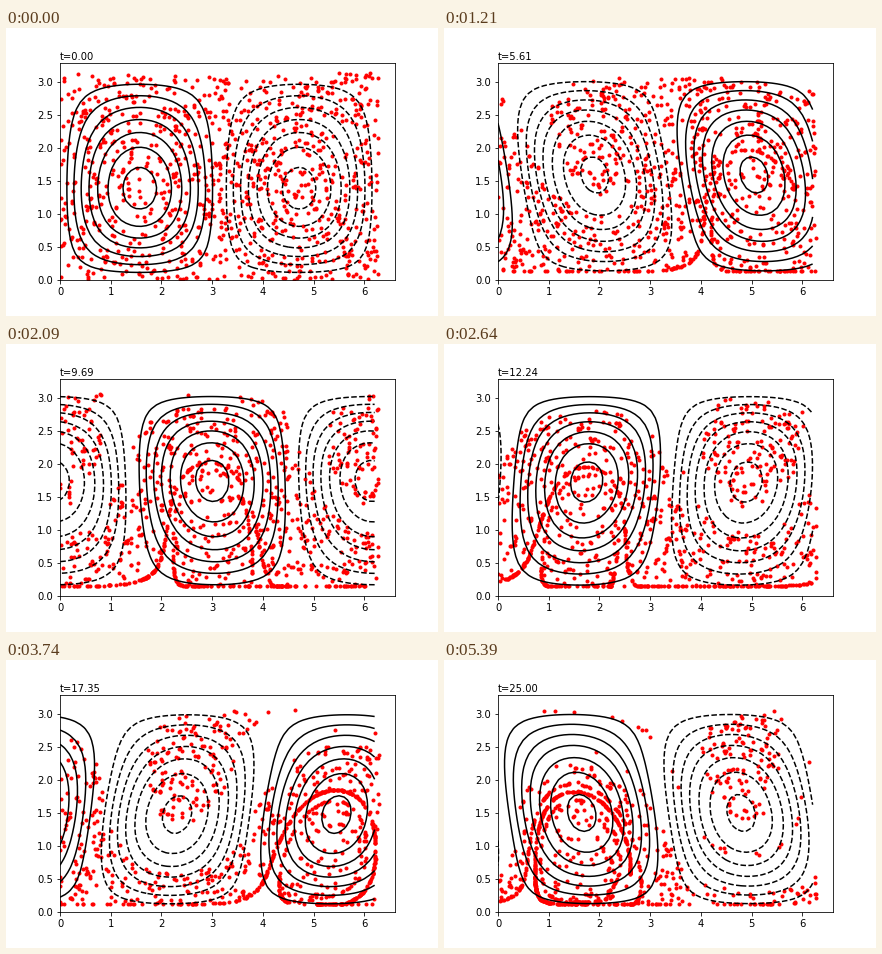
Recreate the animation shown at these times as a matplotlib script. Size 432 by 288 pixels, loop 5500 ms.

```python
import numpy as np
import matplotlib.pyplot as plt
from matplotlib.animation import FuncAnimation

FRAMES, INTERVAL = 50, 110
TIMES = np.linspace(0, 25, FRAMES)
LX, LY = 2 * np.pi, np.pi
EPS = 0.1               # strength of the second wave
C1, C2 = -0.5, -0.2     # phase speeds of the two waves
SINK = 0.06             # slow settling of the tracers
SUBSTEPS = 12
LEVELS = 0.1376 * np.array([n for n in range(-7, 8) if n])


def stream(x, y, t):
    return (np.sin(x - C1 * t) * np.sin(y)
            + EPS * np.sin(x - C2 * t) * np.sin(2 * y))


def velocity(pos, t):
    x, y = pos
    a, b = x - C1 * t, x - C2 * t
    u = -np.sin(a) * np.cos(y) - 2 * EPS * np.sin(b) * np.cos(2 * y)
    v = np.cos(a) * np.sin(y) + EPS * np.cos(b) * np.sin(2 * y)
    return np.array([u, v - SINK])


def advance(pos, t, dt):
    """Midpoint step, periodic in x, with a floor the tracers settle on."""
    middle = pos + velocity(pos, t) * dt / 2
    x, y = pos + velocity(middle, t + dt / 2) * dt
    floor = 0.13 - 0.02 * np.cos((C2 - C1) * (t + dt))
    return np.array([x % LX, np.clip(y, floor, LY)])


def trajectories(count=1000):
    rng = np.random.default_rng(4)
    pos = np.array([rng.uniform(0, LX, count), rng.uniform(0, LY, count)])
    path = [pos]
    dt = (TIMES[1] - TIMES[0]) / SUBSTEPS
    for start in TIMES[:-1]:
        for k in range(SUBSTEPS):
            pos = advance(pos, start + k * dt, dt)
        path.append(pos)
    return path


path = trajectories()
grid_x, grid_y = np.meshgrid(np.arange(0, LX, 0.1), np.arange(0, LY, 0.1))

plt.rcParams.update({"font.family": "DejaVu Sans", "font.size": 10})
fig = plt.figure(figsize=(6, 4), dpi=72, facecolor="white")
ax = fig.add_axes([0.125, 0.125, 0.775, 0.755])


def draw(i):
    t = TIMES[i]
    ax.clear()
    ax.plot(*path[i], "r.", markersize=6, zorder=2)
    ax.contour(grid_x, grid_y, stream(grid_x, grid_y, t), LEVELS,
               colors="k", linewidths=1.5, zorder=2.1)
    ax.set_xlim(0, 1.05 * LX)
    ax.set_ylim(0, 1.05 * LY)
    ax.text(0, 1.01, f"t={t:.2f}", transform=ax.transAxes)
    return []


anim = FuncAnimation(fig, draw, frames=FRAMES, init_func=lambda: draw(0),
                     interval=INTERVAL, repeat=True, repeat_delay=0)
plt.show()
```
